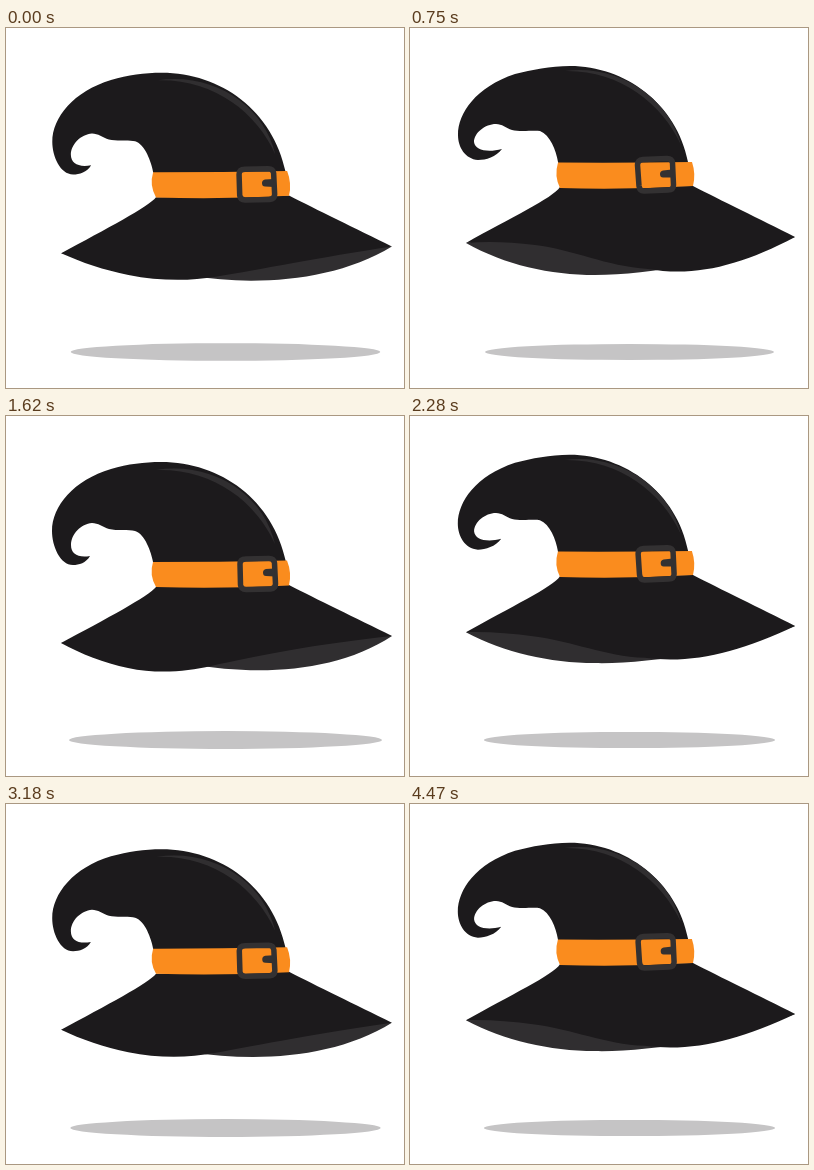
Animation, 398 px wide and 360 px high, one loop 4500 ms. Source, as an HTML page:

```html
<!DOCTYPE html>
<html lang="en">
<head>
<meta charset="utf-8">
<title>Floating witch hat</title>
<style>
html, body { margin: 0; width: 100%; height: 100%; overflow: hidden; background: #fff; }
svg { display: block; width: 100vw; height: 100vh; }
</style>
</head>
<body>
<svg id="stage" viewBox="0 0 398 360" preserveAspectRatio="xMidYMid meet"></svg>
<script>
const LOOP = 4500, STEP = 30, PERIOD = 1800, PEAK = 675;
const INK = '#1c1a1c', GREY = '#302e30', METAL = '#333132', ORANGE = '#fa8c1e';
const stage = document.getElementById('stage');

// Each part has a raised and a lowered outline with matching commands.
const parts = [
  { fill: GREY, // underside of the brim
    up: 'M56 215 C95 237 140 247 185 247 C240 247 320 232 385 209 L216 185 Z',
    down: 'M55 227 C95 234 130 243 185 248 C250 260 330 257 386 220 L216 195 Z' },
  { fill: INK, // top of the brim
    up: 'M150 159 C143 170 100 190 56 215 C78 213 100 214 125 217 C165 222 195 238 238 241 C285 249 330 238 385 209 C350 191 310 172 283 158 Z',
    down: 'M150 171 C143 180 100 203 55 227 C75 238 98 247 122 252 C150 258 180 256 205 250 C250 240 310 228 386 220 C350 202 310 183 283 169 Z' },
  { fill: INK, // crown
    up: 'M152 150 L148 134 C146 122 140 107 130 103 C124 102 110 104 102 102 C96 100 92 96 86 96 C75 96 64 105 64 114 C65 122 77 125 92 121 C86 129 76 132 68 132 C55 131 48 119 48 107 C48 85 66 59 105 46 C122 42 140 38 160 38 C215 38 267 76 278 134 L280 150 Z',
    down: 'M152 162 L147 146 C145 136 139 118 129 115 C123 113 111 115 103 113 C97 111 92 107 86 107 C75 108 65 118 65 129 C65 138 72 142 84 140 C80 147 73 149 67 149 C54 149 46 130 46 115 C46 90 68 64 105 53 C122 48 138 46 155 46 C215 46 267 84 280 146 L280 162 Z' },
  { fill: GREY, // highlight
    up: 'M155 43 C209 36 259 70 271 117 C252 75 209 42 155 43 Z',
    down: 'M150 54 C207 45 258 79 269 128 C250 85 206 52 150 54 Z' },
  { fill: ORANGE, // band
    up: 'M148 134.5 Q215 135 282 134 Q286 146 283 158 Q216 162 150 160 Q144 148 148 134.5 Z',
    down: 'M147 146 Q214 146 281 144.5 Q286 157 283 169.5 Q216 173 150 171 Q143 159 147 146 Z' },
  { fill: 'none', stroke: METAL, width: 5.5, // buckle
    up: 'M233 131.5 L257 130.5 Q262 130.5 262.5 135 L263.5 157 Q263.5 162 258 162 L234 163 Q229.5 163 229 158 L227.5 137 Q227.5 132 233 131.5 Z',
    down: 'M240 143 L263 142.5 Q268 142.5 268.5 147 L269.5 168 Q269.5 172.5 264.5 173 L240 173.5 Q235 173.5 234.5 169 L234 148 Q234 143 240 143 Z' },
  { fill: METAL, // prong
    up: 'M262 141.5 L253 142.5 Q250 143 250 146 Q250 149.5 253 149.5 L263 149.5 Z',
    down: 'M268 152.5 L260 153 Q257 153.5 257 156.5 Q257 160 260 160 L269 160.5 Z' }
];

function add(tag, attrs) {
  const el = document.createElementNS('http://www.w3.org/2000/svg', tag);
  for (const key in attrs) el.setAttribute(key, attrs[key]);
  return stage.appendChild(el);
}

const lerp = (a, b, k) => a + (b - a) * k;

function mixPath(a, b, k) {
  const ends = b.match(/[\d.]+/g);
  let i = 0;
  return a.replace(/[\d.]+/g, n => lerp(+n, +ends[i++], k).toFixed(2));
}

const shadow = add('ellipse', { cx: 219.5, cy: 324, fill: '#c5c4c5' });
for (const p of parts) {
  p.el = add('path', { fill: p.fill, stroke: p.stroke || 'none', 'stroke-width': p.width || 0 });
}

function draw(ms) {
  const t = Math.floor(ms % LOOP / STEP) * STEP;
  const sink = -Math.cos((t - PEAK) / PERIOD * 2 * Math.PI);
  const k = (sink + 0.966) / 1.954;
  for (const p of parts) p.el.setAttribute('d', mixPath(p.up, p.down, k));
  shadow.setAttribute('rx', lerp(144.5, 156.5, k));
  shadow.setAttribute('ry', lerp(8, 9, k));
}

const start = performance.now();
function tick() {
  draw(performance.now() - start);
  requestAnimationFrame(tick);
}
tick();
</script>
</body>
</html>
```
